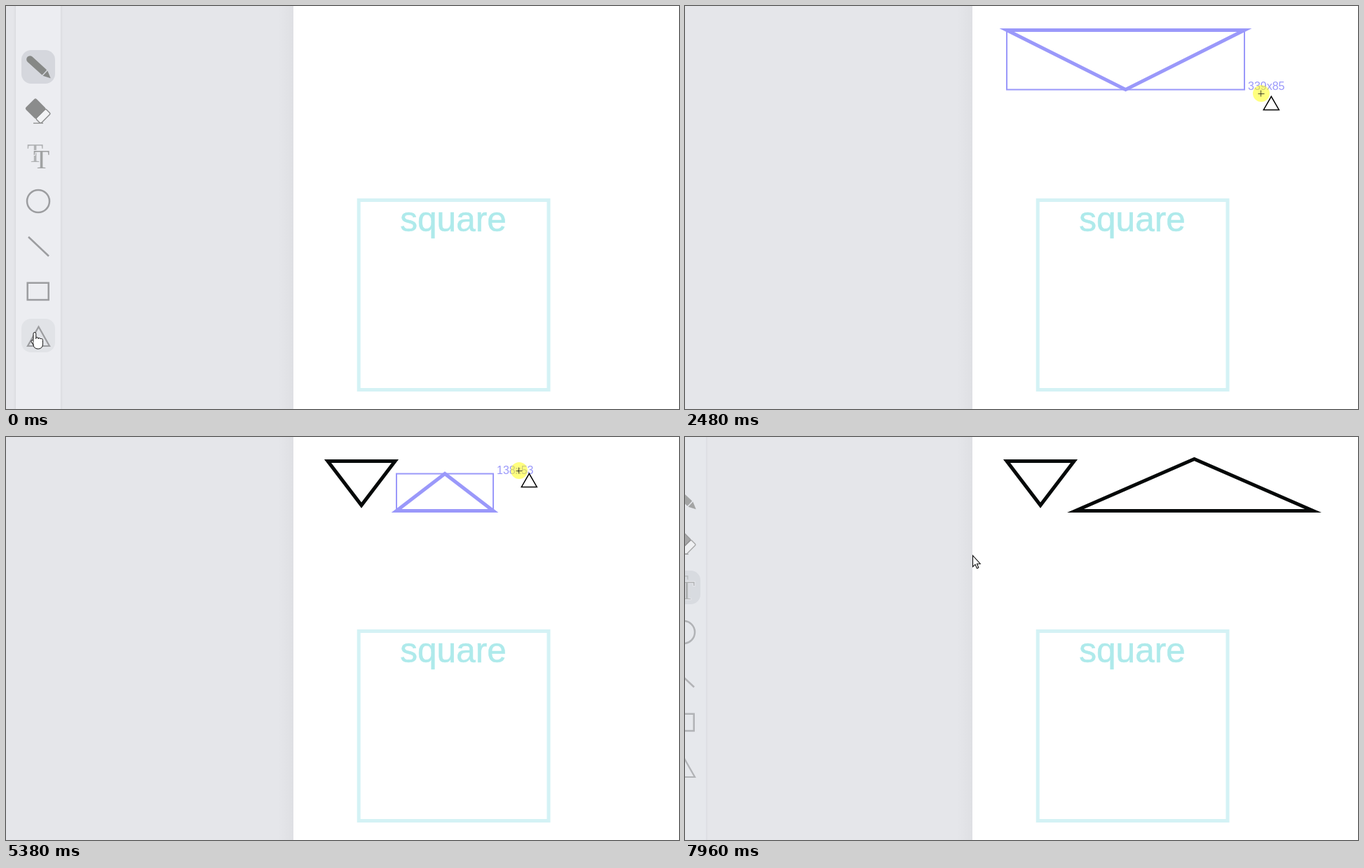
An HTML page with a canvas that plays this animation: 960x576 px, repeating every 7990 ms.

```html
<!DOCTYPE html>
<html lang="en">
<head>
<meta charset="utf-8">
<title>Drawing triangles</title>
<style>
  html, body { margin: 0; width: 100%; height: 100%; overflow: hidden; background: #e5e6ea; }
  canvas { display: block; width: 960px; height: 576px; }
</style>
</head>
<body>
<canvas id="stage" width="960" height="576"></canvas>
<script>
const ctx = document.getElementById('stage').getContext('2d');
const LOOP = 7990, LAG = 40, PAGE_X = 410, TUCK = 48;
const PENCIL = 0, TEXT = 2, TRIANGLE = 6, ROW = 64;
const PURPLE = '#9a98fa', INK = '#050808', PANEL = '#ecedf1', GRAY = '#9c9da0', DARK = '#868886';
const SANS = '"Liberation Sans", Arial, sans-serif', SERIF = '"Liberation Serif", Times, serif';

const clamp = v => Math.max(0, Math.min(1, v));
function ease(t, from, to) {
  const k = clamp((t - from) / (to - from));
  return k ** 3 * (k * (6 * k - 15) + 10);
}

// The pointer rests between moves; a higher bend makes y arrive ahead of x.
const moves = [];
const move = (from, to, x, y, bend = 1) => moves.push({ from, to, x, y, bend });
move(0, 1, 41, 467);
move(790, 1640, 459, 34);
move(1880, 2680, 863, 135);
move(2735, 3185, 589, 115);
move(3420, 3940, 556, 88, 2);
move(3970, 4070, 555, 97);
move(4920, 4980, 557, 105);
move(5042, 5692, 881, 45, 4);
move(5730, 5960, 896, 31);
move(6770, 7450, 42, 212);
move(7650, 7960, 410, 169);

const drags = [{ from: 1880, to: 4200 }, { from: 4990, to: 6310 }];
const clicks = [{ from: 530, to: 600 }, { from: 7650, to: 7710 }];
const during = t => span => t >= span.from && t < span.to;

function pointer(t) {
  let { x, y } = moves[0];
  for (const m of moves) {
    const k = ease(t, m.from, m.to);
    x += (m.x - x) * k;
    y += (m.y - y) * (1 - (1 - k) ** m.bend);
  }
  return { x: Math.round(x), y: Math.round(y) };
}

function paint(stroke, width, fill) {
  if (fill) { ctx.fillStyle = fill; ctx.fill(); }
  if (stroke) { ctx.strokeStyle = stroke; ctx.lineWidth = width; ctx.stroke(); }
}

function box(x, y, w, h, radius, stroke, width, fill) {
  ctx.beginPath();
  ctx.roundRect(x, y, w, h, radius);
  paint(stroke, width, fill);
}

function disc(x, y, r, stroke, width, fill) {
  ctx.beginPath();
  ctx.arc(x, y, r, 0, 7);
  paint(stroke, width, fill);
}

function segment(x1, y1, x2, y2, color, width) {
  ctx.beginPath();
  ctx.moveTo(x1, y1);
  ctx.lineTo(x2, y2);
  paint(color, width);
}

// Isosceles triangle: base from x1 to x2, tip above or below its middle
function triangle(x1, x2, baseY, tipY, stroke, width, fill) {
  ctx.beginPath();
  ctx.moveTo(x1, baseY);
  ctx.lineTo(x2, baseY);
  ctx.lineTo((x1 + x2) / 2, tipY);
  ctx.closePath();
  paint(stroke, width, fill);
}

function text(str, x, y, font, color, align = 'left', outline) {
  ctx.font = font;
  ctx.textAlign = align;
  ctx.fillStyle = color;
  if (outline) {
    ctx.strokeStyle = outline.color;
    ctx.lineWidth = outline.width;
    ctx.strokeText(str, x, y);
  }
  ctx.fillText(str, x, y);
}

function place(x, y, degrees, drawPart) {
  ctx.save();
  ctx.translate(x, y);
  ctx.rotate(degrees * Math.PI / 180);
  drawPart();
  ctx.restore();
}

function page() {
  box(0, 0, 960, 576, 0, null, 0, '#e5e6ea');
  const shade = ctx.createLinearGradient(388, 0, PAGE_X, 0);
  shade.addColorStop(0, 'rgba(0,0,0,0)');
  shade.addColorStop(1, 'rgba(0,0,0,.028)');
  box(388, 0, PAGE_X - 388, 576, 0, null, 0, shade);
  box(PAGE_X, 0, 550, 576, 0, null, 0, '#fff');
  box(503.2, 277.5, 270.8, 271, 0, '#d4f2f5', 5);
  const color = '#aeeaeb';
  text('square', 638, 322, '49.5px ' + SANS, color, 'center', { color, width: .6 });
}

function pencilIcon() {
  box(-21, -5, 33, 10, [5, 1, 1, 5], null, 0, DARK);
  place(13.5, 0, 90, () => triangle(-5, 5, 0, -10.5, null, 0, DARK));
}

function eraserIcon() {
  box(10.5, -10, 10, 20, 2, '#8b8c8c', 1.4, '#f2f3f5');
  box(-10, -10, 20.5, 20, 2, '#8b8c8c', 1.4, '#8b8c8c');
}

function icons() {
  place(46, 87, 42.5, pencilIcon);
  place(42, 146.5, 45, eraserIcon);
  segment(39, 167.5, 53, 167.5, '#8b8c8c', 1.3);
  text('T', 41.5, 222.5, '38px ' + SERIF, '#b1b3b5', 'center');
  text('T', 50.5, 231.5, '38px ' + SERIF, '#a0a2a3', 'center', { color: PANEL, width: 2 });
  disc(46, 279, 16, GRAY, 2.5);
  segment(32, 330, 61, 357.5, GRAY, 2.5);
  box(30.7, 395.7, 30, 24.2, 0, GRAY, 2.5);
  triangle(31, 62, 486, 458.5, GRAY, 2.2);
}

// Returns the right edge of the panel.
function toolbar(t, { x, y }) {
  const shift = TUCK * (ease(t, 960, 1210) - ease(t, 7170, 7400) + ease(t, 7730, 7920));
  const selected = t < 600 ? PENCIL : t < 7650 ? TRIANGLE : TEXT;
  const hover = x < 70 - shift ? Math.floor((y - 55) / ROW) : selected;
  ctx.save();
  ctx.translate(-shift, 0);
  ctx.globalAlpha = 1 - .3 * shift / TUCK;
  box(11, 0, 70, 576, 0, null, 0, 'rgba(0,0,0,.015)');
  box(13, 0, 66, 576, 0, null, 0, '#dbdce0');
  box(14, 0, 64, 576, 0, null, 0, PANEL);
  box(22, 63 + ROW * hover, 48, 48, 14, null, 0, '#e1e3e7');
  box(22, 63 + ROW * selected, 48, 48, 14, null, 0, '#d5d7dd');
  icons();
  ctx.restore();
  return 78 - shift;
}

function drawnTriangle(start, end, color) {
  triangle(start.x, end.x, start.y + .5, end.y + .5, color, 5);
}

function preview(start, end) {
  const w = Math.abs(end.x - start.x), h = Math.abs(end.y - start.y);
  box(start.x, Math.min(start.y, end.y) + .5, w, h, 0, PURPLE, 2);
  drawnTriangle(start, end, PURPLE);
  text(`${w}x${h}`, end.x + 5, end.y + 1, '16px ' + SANS, PURPLE);
}

const arrow = new Path2D('M.5.5V16.5L4 13.2L6.5 18.7L8.8 17.7L6.5 12.2H11.2Z');

function handCursor() {
  for (let i = 3; i >= 0; i--) {
    const top = i ? 5.5 + i : -.5;
    box(-2 + 3.2 * i, top, 3.8, 15 - top, 1.9, '#111', 1, '#fff');
  }
  place(-3.2, 12.5, -35, () => box(-1.7, -2, 3.4, 8, 1.7, '#111', 1, '#fff'));
  box(-2, 12, 13.4, 11, [0, 0, 6, 6], '#111', 1, '#fff');
  box(-1.5, 9, 12.4, 8, 2, null, 0, '#fff');
}

function arrowCursor() {
  ctx.fillStyle = '#fff';
  ctx.strokeStyle = '#111';
  ctx.lineWidth = 1.1;
  ctx.fill(arrow);
  ctx.stroke(arrow);
}

function drawCursor(crossAlpha) {
  triangle(3.3, 25.3, 23.5, 4.3, '#000', 1.5, '#fff');
  ctx.globalAlpha = crossAlpha;
  segment(-4.5, .5, 4.5, .5, '#222', 1);
  segment(-.5, -4.5, -.5, 4.5, '#222', 1);
}

function draw(t) {
  const spot = pointer(t), drag = drags.find(during(t));
  page();
  const panelEdge = drag ? 0 : toolbar(t, spot);
  for (const d of drags) if (t >= d.to) drawnTriangle(pointer(d.from), pointer(d.to), INK);
  if (drag && t > drag.from + LAG) preview(pointer(drag.from), pointer(t - LAG));
  if (drag || clicks.some(during(t))) disc(spot.x, spot.y, 12, null, 0, 'rgba(255,255,0,.5)');
  const crossAlpha = drag && t < drag.from + 30 ? .15 : .8;
  place(spot.x, spot.y, 0, () => {
    if (spot.x > PAGE_X) drawCursor(crossAlpha);
    else if (spot.x < panelEdge) handCursor();
    else arrowCursor();
  });
}

function tick() {
  draw(performance.now() % LOOP);
  requestAnimationFrame(tick);
}
tick();
</script>
</body>
</html>
```
